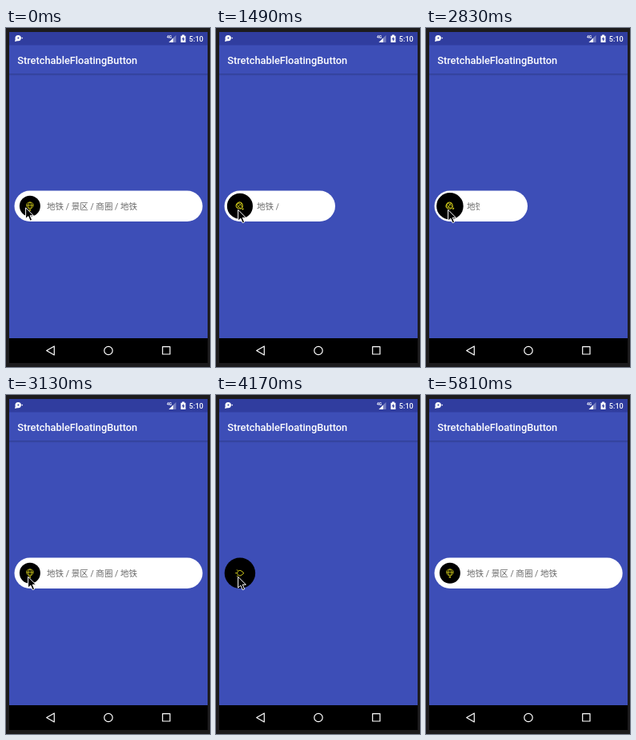
Animation, 255 px wide and 424 px high, one loop 6330 ms. Source, as an HTML page:

```html
<!DOCTYPE html>
<html lang="zh-CN">
<head>
<meta charset="utf-8">
<title>Stretchable button</title>
<style>
  html, body { margin: 0; width: 100%; height: 100%; overflow: hidden; background: #1c1b1d; }
  svg { display: block; width: 255px; height: 424px; }
  text { font-family: Roboto, "Noto Sans CJK SC", "Noto Sans CJK", sans-serif; fill: #fff; }
  .title { font-size: 12.8px; font-weight: 500; }
  .clock { font-size: 9.1px; font-weight: 500; }
  .net { font-size: 5px; font-weight: 700; }
  .hint { font-size: 10.55px; fill: #686868; }
  .nav { fill: none; stroke: #fff; stroke-width: 1.2; stroke-linejoin: round; }
  .icon { fill: none; stroke: #d6d01c; stroke-width: 1; }
</style>
</head>
<body>
<svg viewBox="0 0 255 424">
  <defs>
    <linearGradient id="shade" x2="0" y2="1">
      <stop stop-color="#000" stop-opacity=".2"/>
      <stop offset="1" stop-color="#000" stop-opacity="0"/>
    </linearGradient>
    <clipPath id="reveal"><rect id="window" x="50.5" y="204" height="38"/></clipPath>
  </defs>

  <rect width="255" height="424" fill="#1c1b1d"/>
  <rect x="4" y="5" width="248" height="383" fill="#3d4eb7"/>
  <rect x="4" y="5" width="248" height="16.5" fill="#303d9f"/>
  <rect x="4" y="57" width="248" height="3" fill="url(#shade)"/>
  <rect x="4" y="388" width="248" height="31" fill="#000"/>

  <!-- status bar -->
  <circle cx="15.2" cy="12.6" r="3.7" fill="#fff"/>
  <path d="M11 17l1-4 3 3z" fill="#fff"/>
  <circle cx="15.4" cy="12.4" r="1" fill="#303d9f"/>
  <circle cx="20.2" cy="12.6" r=".8" fill="#fff"/>
  <text class="net" x="201" y="12.8">4G</text>
  <path d="M212.500 9v9h-9z" fill="#fff" opacity=".35"/>
  <path d="M209 12.500V18h-5.500z" fill="#fff"/>
  <path d="M218.500 9.700h1.500v-1.200h3v1.200h1.500V18h-6z" fill="#fff"/>
  <path d="M222 10.700l-2.300 3.600h1.500v2.700l2.200-3.700H222z" fill="#303d9f"/>
  <text class="clock" x="228.800" y="17">5:10</text>
  <text class="title" x="14.200" y="44.800">StretchableFloatingButton</text>

  <!-- navigation bar -->
  <g class="nav">
    <path d="M50.700 403.500L60.300 398v11z"/>
    <circle cx="128" cy="403.500" r="5.200"/>
    <rect x="195.700" y="398.700" width="9.300" height="9.300"/>
  </g>

  <!-- stretching button -->
  <rect id="pill" x="10.500" y="203.500" height="38.500" rx="19.250" fill="#fff"/>
  <g clip-path="url(#reveal)">
    <text class="hint" x="51" y="226.800">地铁 / 景区 / 商圈 / 地铁</text>
  </g>
  <circle id="disc" cx="29.900" cy="222.750" fill="#000"/>
  <g class="icon" transform="translate(29.900 222.750)">
    <g id="balloon">
      <path d="M-1.500 3.200C-5.800-.4-4.300-4.800 0-4.800S5.800-.4 1.500 3.200z"/>
      <path d="M-1 3C-2.600-1-1.800-4 0-4.600 1.800-4 2.600-1 1 3M-4-1H4" stroke-width=".8"/>
      <path d="M-1.200 5.200H1.200" stroke-width="1.400"/>
    </g>
    <path id="bulb" d="M2-2.500L5 0 2 2.500C-.5 4.500-3.200 2.300-3.200 0S-.5-4.500 2-2.500zM-5.800 0h2M-3.800-4.300l1.300 1.500M-3.800 4.300l1.300-1.500"/>
  </g>

  <path id="cursor" d="M.6.8V14.600L3.800 11.600 6.200 17.200 8.600 16.200 6.200 10.700H10.400z"
        fill="#000" stroke="#fff" stroke-width="1" stroke-linejoin="round"/>
</svg>
<script>
  const LOOP = 6330, LEFT = 10.5, CLOSED = 49, OPEN = 245.7;

  // [time, right edge of the button]
  const edges = [
    [0, OPEN], [1340, 236], [1490, 149], [1630, 62], [1780, CLOSED],
    [2830, 127], [2980, 214], [3130, OPEN],
    [3870, 197], [4020, 110], [4170, CLOSED],
    [4920, 79], [5070, 185], [5220, OPEN]
  ];
  // [time, x, y] of the pointer tip
  const points = [
    [0, 24, 224], [300, 24, 223], [1050, 26, 223], [1200, 27, 226.5],
    [5510, 44, 254], [5660, 144.5, 375], [5810, -40, -40]
  ];

  const $ = id => document.getElementById(id);
  const [pill, disc, reveal, balloon, bulb, cursor] =
    ["pill", "disc", "window", "balloon", "bulb", "cursor"].map($);
  const at = (steps, t) => steps.findLast(s => s[0] <= t);
  const show = (el, on) => el.setAttribute("visibility", on ? "visible" : "hidden");

  function draw(t) {
    const right = at(edges, t)[1];
    const open = (right - CLOSED) / (OPEN - CLOSED);
    pill.setAttribute("width", right - LEFT);
    disc.setAttribute("r", 19.25 - 6.25 * open);
    reveal.setAttribute("width", open < 0.2 ? 0 : 116 * open ** 2.1);
    balloon.setAttribute("transform", `rotate(${-90 * (1 - open)})`);
    show(pill, open > 0);
    show(balloon, open > 0);
    show(bulb, open === 0);

    const [, x, y] = at(points, t);
    cursor.setAttribute("transform", `translate(${x} ${y})`);
  }

  const start = performance.now();
  function tick() {
    draw((performance.now() - start) % LOOP);
    requestAnimationFrame(tick);
  }
  tick();
</script>
</body>
</html>
```
